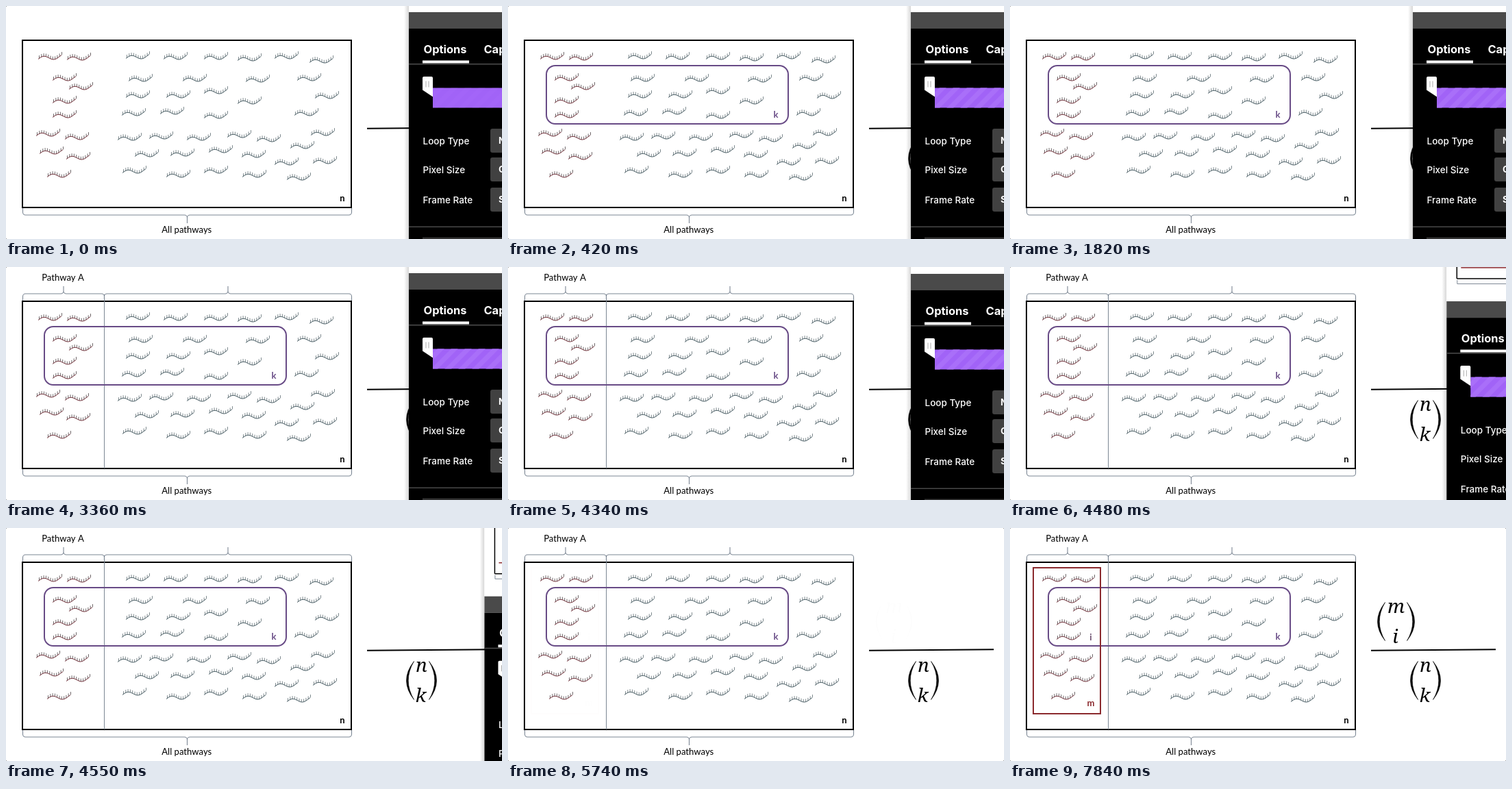
These frames come from a looping animation (724x340 px, 8000 ms). An HTML page with a canvas:

```html
<!DOCTYPE html>
<html lang="en">
<head>
<meta charset="utf-8">
<title>Pathway enrichment</title>
<style>
  html, body { margin: 0; width: 100%; height: 100%; overflow: hidden; background: #fff; }
  canvas { display: block; width: 724px; height: 340px; }
</style>
</head>
<body>
<canvas id="stage" width="724" height="340"></canvas>
<script>
const ctx = document.getElementById('stage').getContext('2d');
const LOOP = 8000;
const LATO = 'Lato, "Open Sans", sans-serif';
const INTER = 'Inter, Roboto, sans-serif';
const MATH = 'italic 28px "Noto Serif", serif';
const PURPLE = '#684b86', RED = '#8b2a2e', RULE = '#7c8794';

// Centres of the transcripts, x and y in turn
const inPathway = [
  64, 74, 106, 75, 85, 105, 109, 118, 85, 138, 85, 159,
  61, 186, 103, 191, 66, 212, 105, 220, 77, 246];
const others = [
  192, 73, 247, 74, 306, 74, 355, 76, 409, 73, 460, 79,
  196, 106, 275, 106, 367, 107, 442, 105,
  192, 130, 251, 130, 306, 124, 355, 139, 468, 131,
  186, 156, 242, 154, 306, 160, 438, 156,
  180, 192, 226, 190, 281, 192, 340, 188, 383, 194, 462, 185, 432, 204,
  205, 216, 257, 215, 313, 210, 361, 217, 409, 228, 465, 226,
  187, 240, 251, 246, 306, 240, 362, 246, 427, 250];

const ramp = (t, from, to) => Math.max(0, Math.min(1, (t - from) / (to - from)));

function text(str, x, y, font, color = '#000', align = 'center') {
  ctx.font = font;
  ctx.fillStyle = color;
  ctx.textAlign = align;
  ctx.fillText(str, x, y);
}

function rect(x, y, w, h, color) {
  ctx.fillStyle = color;
  ctx.fillRect(x, y, w, h);
}

function frame(x, y, w, h, color, width = 2, radius = 0) {
  ctx.strokeStyle = color;
  ctx.lineWidth = width;
  ctx.beginPath();
  ctx.roundRect(x, y, w, h, radius);
  ctx.stroke();
}

function line(x1, y1, x2, y2, color, width = 1) {
  ctx.strokeStyle = color;
  ctx.lineWidth = width;
  ctx.beginPath();
  ctx.moveTo(x1, y1);
  ctx.lineTo(x2, y2);
  ctx.stroke();
}

// One wave, tilted up to the right
const wave = x => 1.5 - 3.2 * Math.sin((x + 17) / 31 * 2 * Math.PI) - 0.12 * x;

function transcripts(points, curve, ticks) {
  for (let i = 0; i < points.length; i += 2) {
    const [cx, cy] = [points[i], points[i + 1]];
    ctx.lineWidth = 0.8;
    ctx.strokeStyle = ticks;
    ctx.beginPath();
    for (let x = -15.5; x < 18; x += 3.3) {
      ctx.moveTo(cx + x, cy + wave(x));
      ctx.lineTo(cx + x, cy + wave(x) - 4.2);
    }
    ctx.stroke();
    ctx.lineWidth = 1;
    ctx.strokeStyle = curve;
    ctx.beginPath();
    for (let x = -17; x <= 17; x++) ctx.lineTo(cx + x, cy + wave(x));
    ctx.stroke();
  }
}

// Brace from x1 to x2: feet at y, bar at yBar, point at yTip
function brace(x1, x2, y, yBar, yTip) {
  const mid = (x1 + x2) / 2, r = 4;
  ctx.strokeStyle = RULE;
  ctx.lineWidth = 1.1;
  ctx.beginPath();
  ctx.moveTo(x1, y);
  ctx.arcTo(x1, yBar, mid, yBar, r);
  ctx.arcTo(mid, yBar, mid, yTip, r);
  ctx.lineTo(mid, yTip);
  ctx.arcTo(mid, yBar, x2, yBar, r);
  ctx.arcTo(x2, yBar, x2, y, r);
  ctx.lineTo(x2, y);
  ctx.stroke();
}

function binomial(top, bottom, cx, y, half) {
  ctx.fillStyle = ctx.strokeStyle = '#000';
  ctx.lineWidth = 0.6;
  for (const side of [-1, 1]) {
    const tip = cx + side * (half - 11);
    ctx.beginPath();
    ctx.moveTo(tip, y);
    ctx.quadraticCurveTo(cx + side * (half + 11), y + 28, tip, y + 56);
    ctx.quadraticCurveTo(cx + side * (half + 5.5), y + 28, tip, y);
    ctx.fill();
    ctx.stroke();
  }
  text(top, cx, y + 15, MATH);
  text(bottom, cx - 1, y + 59, MATH);
}

function faded(alpha, draw) {
  if (alpha <= 0) return;
  ctx.save();
  ctx.globalAlpha = alpha;
  draw();
  ctx.restore();
}

function slide(t) {
  rect(0, 0, 724, 340, '#fff');
  for (const x of [0, 723]) for (const y of [0, 339]) rect(x, y, 1, 1, '#999');

  transcripts(inPathway, '#74363f', '#4a4043');
  transcripts(others, '#4c6067', '#5d6d72');
  frame(24, 50, 480, 244, '#000');
  text('n', 491, 285, 'bold 13px ' + LATO);
  brace(24.5, 504.5, 295, 305, 317);
  text('All pathways', 263.7, 331, '13.1px ' + LATO);
  line(527, 178.8, 709, 177.2, '#000', 2);

  if (t >= 2590) {
    brace(24.5, 143.5, 49, 39, 28);
    brace(143.5, 504.5, 49, 39, 28);
    line(143.5, 40, 143.5, 294, RULE);
    text('Pathway A', 83, 20, '13.1px ' + LATO);
  }
  faded(ramp(t, 60, 215), () => {
    frame(56, 87, 353, 85, PURPLE, 2, 13);
    text('k', 391, 163, 'bold 13px ' + LATO, PURPLE);
    binomial('n', 'k', 606.5, 194.5, 22);
  });
  faded(ramp(t, 5740, 5890), () => {
    frame(34, 58, 98, 213, RED);
    text('m', 118, 260, 'bold 13px ' + LATO, RED);
    text('i', 118, 164, 'bold 13px ' + LATO, '#694c6c');
    binomial('m', 'i', 563.5, 108.5, 27);
  });
}

function timeline(t) {
  rect(623, 119.5, 150, 29, '#a163f7');
  ctx.save();
  ctx.beginPath();
  ctx.rect(623, 119.5, 150, 29);
  ctx.clip();
  ctx.globalAlpha = 0.2 + 0.8 * ramp(t, 60, 420);
  for (let x = 600; x < 790; x += 20) line(x, 154, x + 39, 115, '#a96ff9', 7);
  ctx.restore();

  ctx.fillStyle = '#fff';
  ctx.beginPath();
  ctx.moveTo(608, 105);
  ctx.arcTo(608, 103, 610, 103, 2);
  ctx.arcTo(623, 103, 623, 105, 2);
  ctx.lineTo(623, 132.5);
  ctx.lineTo(608, 122.5);
  ctx.fill();
  rect(612.5, 109.5, 1, 9, '#aaa');
  rect(616.5, 109.5, 1, 9, '#aaa');
}

function panel(t) {
  const p = Math.max(0, (t - 4340) / 140);
  const dx = 48.6 * p * p, dy = ramp(t, 4190, 4340) + 39.5 * p * p;
  if (dx > 145) return;
  ctx.save();
  ctx.translate(dx, dy);

  const shade = ctx.createLinearGradient(581, 0, 588, 0);
  shade.addColorStop(0, 'rgba(0,0,0,0)');
  shade.addColorStop(1, 'rgba(0,0,0,.16)');
  rect(581, -160, 7, 520, shade);

  // Preview area above the settings
  rect(588, -160, 200, 169, '#fff');
  line(603, -160, 603, -24, '#000', 1.5);
  line(603, -24, 788, -24, '#000', 1.5);
  line(609, -40, 788, -40, RED, 1.5);
  line(603.5, -22, 603.5, -16.5, RULE);
  line(603.5, -16.5, 788, -16.5, RULE);

  rect(588, 9, 200, 24, '#4a4a4a');
  rect(588, 33, 200, 330, '#000');
  text('Options', 609.5, 68.5, '700 16.4px ' + INTER, '#fff', 'left');
  text('Caption', 697.5, 68.5, '700 16.4px ' + INTER, '#fff', 'left');
  rect(588, 84, 200, 1.5, '#4d4d4d');
  rect(608, 79.5, 68, 4, '#fff');
  timeline(t);

  [['Loop Type', 'N'], ['Pixel Size', 'O'], ['Frame Rate', 'S']].forEach(([label, value], i) => {
    const y = [201.5, 243.5, 287.5][i];
    text(label, 608.5, y, '500 13.5px ' + INTER, '#fff', 'left');
    ctx.fillStyle = '#414141';
    ctx.beginPath();
    ctx.roundRect(707, y - 22.5, 80, 35, 3);
    ctx.fill();
    text(value, 719, y - 0.5, '700 13px ' + INTER, '#fff', 'left');
  });
  rect(588, 321.5, 200, 1.5, '#484848');
  rect(608, 337.5, 180, 30, '#333');
  ctx.restore();
}

const start = performance.now();

function tick() {
  const t = (performance.now() - start) % LOOP;
  slide(t);
  panel(t);
  requestAnimationFrame(tick);
}
tick();
</script>
</body>
</html>
```
